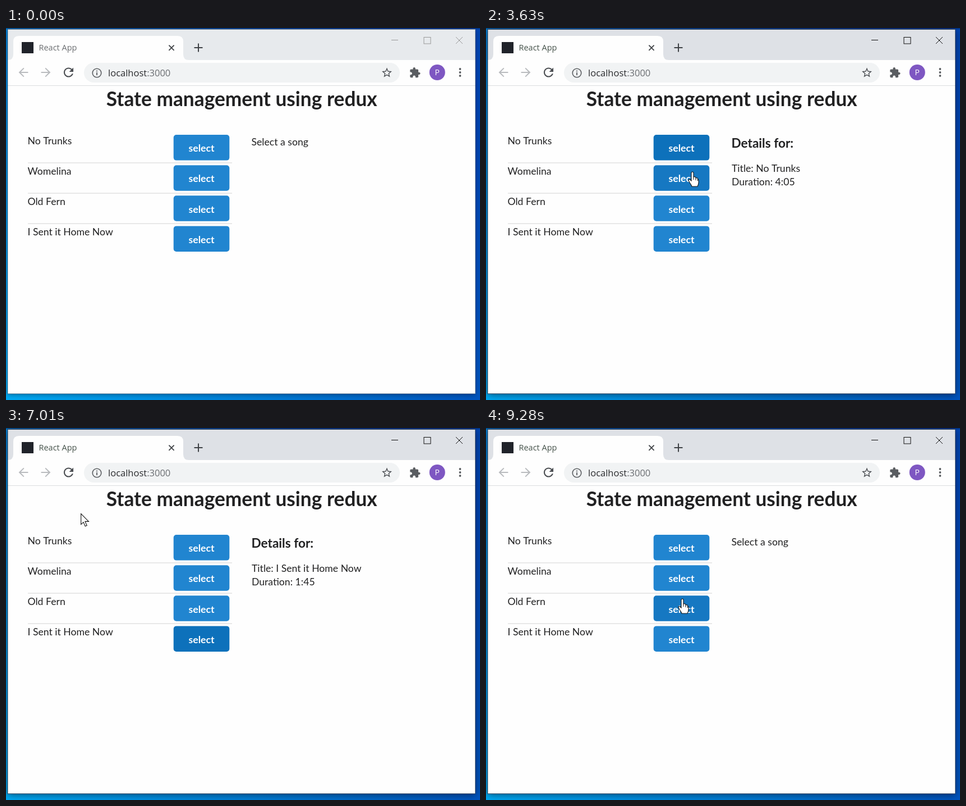
An HTML page with a canvas for the animation above (9480 ms loop, 845 by 662 pixels).

```html
<!DOCTYPE html>
<html lang="en">
<head>
<meta charset="utf-8">
<title>State management using redux</title>
<style>
html, body { margin: 0; width: 100%; height: 100%; overflow: hidden; }
canvas { display: block; }
</style>
</head>
<body>
<canvas id="stage" width="845" height="662"></canvas>
<script>
const ctx = document.getElementById('stage').getContext('2d');
const LOOP = 9480;
const UI = '"Open Sans", "Noto Sans", sans-serif';
const LATO = 'Lato, sans-serif';
const INK = '#212122';

const songs = [
  { title: 'No Trunks', duration: '4:05' },
  { title: 'Womelina', duration: '2:30' },
  { title: 'Old Fern', duration: '3:15' },
  { title: 'I Sent it Home Now', duration: '1:45' }
];
const BTN = { x: 298.7, y: 190.1, w: 99.6, h: 45.5, pitch: 54.1 };

const CLICKS = [
  { down: 2740, up: 2920, row: 0 },
  { down: 4010, up: 4200, row: 1 },
  { down: 5220, up: 5500, row: 3 }
];
const FOCUS_AT = 2740;
const LOAD = { start: 7930, blank: 8500, ready: 8600, end: 8880 };

// Pointer moves: start, last step, steps, end point, ease-out power
const ENTRY = [785, 668];
const MOVES = [
  [710, 1030, 4, 674, 557, 1],
  [1310, 1500, 3, 546, 455, 1.5],
  [1780, 2530, 9, 357, 211, 2],
  [3450, 3810, 5, 370, 264, 2],
  [4560, 5040, 6, 367, 372, 4],
  [5870, 6770, 10, 241, 234, 1.5],
  [7010, 7010, 1, 133, 152, 1],
  [7100, 7660, 7, 107, 86, 1.5],
  [8790, 9280, 6, 350, 304, 1.5]
];

const icon = {
  back: new Path2D('M20 11.1H7.83l5.59-5.69L12.2 4.2 4 12l8.2 7.8 1.21-1.21L7.83 12.9H20z'),
  reload: new Path2D('M17.65 6.35C16.2 4.9 14.21 4 12 4c-4.42 0-7.99 3.58-7.99 8s3.57 8 7.99 8c3.73 0 6.84-2.55 7.73-6h-2.08c-.82 2.33-3.04 4-5.65 4-3.31 0-6-2.69-6-6s2.69-6 6-6c1.66 0 3.14.69 4.22 1.78L13 11h7V4l-2.35 2.35z'),
  star: new Path2D('M22 9.24l-7.19-.62L12 2 9.19 8.63 2 9.24l5.46 4.73L5.82 21 12 17.27 18.18 21l-1.63-7.03zM12 15.4l-3.76 2.27 1-4.28-3.32-2.88 4.38-.38L12 6.1l1.71 4.04 4.38.38-3.32 2.88 1 4.28z'),
  puzzle: new Path2D('M20.5 11H19V7c0-1.1-.9-2-2-2h-4V3.5C13 2.12 11.88 1 10.5 1S8 2.12 8 3.5V5H4c-1.1 0-1.99.9-1.99 2v3.8H3.5c1.49 0 2.7 1.21 2.7 2.7s-1.21 2.7-2.7 2.7H2V20c0 1.1.9 2 2 2h3.8v-1.5c0-1.49 1.21-2.7 2.7-2.7 1.49 0 2.7 1.21 2.7 2.7V22H17c1.1 0 2-.9 2-2v-4h1.5c1.38 0 2.5-1.12 2.5-2.5S21.88 11 20.5 11z'),
  arrow: new Path2D('M.7 .7V19.6L5 15.6 8.2 22.8 11.2 21.4 8 14.4H14.4Z'),
  hand: new Path2D('M-2 2Q-2 0 0 0T2 2V9Q6 8 6 11Q10 10 9.5 13Q11 13 11 15V19Q11 22 9 26H-1Q-2 23 -5 19L-7 15Q-6 12 -4 14L-2 16Z')
};

function rect(x, y, w, h, color) {
  ctx.fillStyle = color;
  ctx.fillRect(x, y, w, h);
}

function round(x, y, w, h, r, color) {
  ctx.fillStyle = color;
  ctx.beginPath();
  ctx.roundRect(x, y, w, h, r);
  ctx.fill();
}

function disc(x, y, r, color) {
  ctx.fillStyle = color;
  ctx.beginPath();
  ctx.arc(x, y, r, 0, 7);
  ctx.fill();
}

function arc(x, y, r, from, to, color, width) {
  ctx.strokeStyle = color;
  ctx.lineWidth = width;
  ctx.beginPath();
  ctx.arc(x, y, r, from, to);
  ctx.stroke();
}

function lines(color, width, ...segments) {
  ctx.strokeStyle = color;
  ctx.lineWidth = width;
  ctx.beginPath();
  for (const [x1, y1, x2, y2] of segments) {
    ctx.moveTo(x1, y1);
    ctx.lineTo(x2, y2);
  }
  ctx.stroke();
}

function cross(x, y, r, color, width) {
  lines(color, width, [x - r, y - r, x + r, y + r], [x - r, y + r, x + r, y - r]);
}

function text(str, x, y, font, color, align = 'left') {
  ctx.font = font;
  ctx.fillStyle = color;
  ctx.textAlign = align;
  ctx.fillText(str, x, y);
}

// Draws a 24-unit icon around a centre point
function glyph(path, x, y, sx, color, sy = sx) {
  ctx.save();
  ctx.translate(x, y);
  ctx.scale(sx, sy);
  ctx.translate(-12, -12);
  ctx.fillStyle = color;
  ctx.fill(path, 'evenodd');
  ctx.restore();
}

function pointerAt(t) {
  let [x, y] = ENTRY;
  for (const [from, to, steps, ex, ey, power] of MOVES) {
    if (t < from) break;
    const gap = steps > 1 ? (to - from) / (steps - 1) : 1;
    const step = Math.min(steps, Math.floor((t - from + 10) / gap) + 1);
    const f = 1 - (1 - step / steps) ** power;
    x += (ex - x) * f;
    y += (ey - y) * f;
  }
  return { x: Math.round(x), y: Math.round(y) };
}

const rowTop = row => BTN.y + row * BTN.pitch;

function rowUnder(p) {
  if (p.x < BTN.x || p.x > BTN.x + BTN.w) return -1;
  return songs.findIndex((_, i) => p.y >= rowTop(i) && p.y <= rowTop(i) + BTN.h);
}

function stateAt(t) {
  const s = { pointer: pointerAt(t), focus: -1, pressed: -1, song: null };
  s.hover = rowUnder(s.pointer);
  s.active = t >= FOCUS_AT;
  s.loading = t >= LOAD.start && t < LOAD.end;
  s.blank = t >= LOAD.blank && t < LOAD.ready;
  if (t < LOAD.blank) {
    for (const c of CLICKS) {
      if (t < c.down) break;
      s.focus = c.row;
      s.pressed = t < c.up ? c.row : -1;
      if (t >= c.up) s.song = songs[c.row];
    }
  }
  return s;
}

function drawDesktop(active) {
  const g = ctx.createLinearGradient(0, 662, 845, 200);
  g.addColorStop(0, '#00a8f2');
  g.addColorStop(.45, '#0078d4');
  g.addColorStop(.75, '#0056c0');
  g.addColorStop(1, '#0045b4');
  rect(0, 0, 845, 662, g);
  rect(0, 0, 845, 2, 'rgba(0,30,80,.4)');

  ctx.save();
  ctx.shadowColor = active ? 'rgba(0,0,0,.5)' : 'rgba(0,0,0,.35)';
  ctx.shadowBlur = active ? 12 : 8;
  ctx.shadowOffsetY = 2;
  rect(3, 2, 834, 649, '#fefefe');
  ctx.restore();
}

function drawFrame(active) {
  ctx.strokeStyle = active ? 'rgba(0,25,55,.75)' : 'rgba(0,30,60,.45)';
  ctx.lineWidth = 1;
  ctx.strokeRect(3, 2.5, 833.7, 648.3);
}

function drawTabs(t, s) {
  rect(3, 3, 834, 54, s.active ? '#dee1e6' : '#e7eaed');
  ctx.fillStyle = '#fefefe';
  ctx.beginPath();
  ctx.moveTo(3, 57);
  ctx.quadraticCurveTo(13, 57, 13, 47);
  ctx.lineTo(13, 24);
  ctx.quadraticCurveTo(13, 14, 23, 14);
  ctx.lineTo(306, 14);
  ctx.quadraticCurveTo(316, 14, 316, 24);
  ctx.lineTo(316, 47);
  ctx.quadraticCurveTo(316, 57, 326, 57);
  ctx.fill();

  if (s.loading) {
    const a = (t - 8400) / 200 - 1.7;
    disc(39.5, 34.5, 6.5, '#20232a');
    arc(39.5, 34.5, 8.8, a, a + 2.4, '#93a7b9', 1.8);
  } else {
    rect(28, 25, 21, 20, '#20232a');
  }
  text('React App', 58.5, 40, '14.5px ' + UI, s.active ? '#45524a' : '#6b6e71');
  cross(295, 35.2, 4.6, '#3f4246', 1.8);
  lines('#3f4246', 2, [335.5, 35, 350.5, 35], [343, 27.5, 343, 42.5]);

  const ctl = s.active ? '#111' : '#999';
  lines(ctl, 1, [687, 21.5, 699, 21.5]);
  ctx.strokeRect(745, 16.5, 12, 11.5);
  cross(808, 22, 6, ctl, 1);
}

function drawToolbar(s) {
  const grey = '#5a5d61';
  rect(3, 57, 834, 45, '#fefefe');
  rect(3, 102, 834, 1, '#dcdee0');
  glyph(icon.back, 31, 79, 1.05, '#b9bbbe');
  glyph(icon.back, 71, 79, -1.05, '#b9bbbe', 1.05);
  if (Math.hypot(s.pointer.x - 111, s.pointer.y - 79) < 17) {
    disc(111.5, 79.5, 17.5, '#ebebec');
  }
  glyph(icon.reload, 111.5, 79, 1.07, '#4b4e52');

  round(139, 62, 563, 35, 17.5, '#f1f3f4');
  arc(162, 80, 7.8, 0, 7, grey, 1.6);
  rect(161.1, 79, 1.8, 5, grey);
  rect(161.1, 75.6, 1.8, 1.9, grey);
  const font = '16.5px ' + UI;
  text('localhost', 182, 86, font, '#2a2b2e');
  text(':3000', 182 + ctx.measureText('localhost').width, 86, font, '#6a6d71');

  glyph(icon.star, 679, 79.5, .9, '#505357');
  glyph(icon.puzzle, 729, 79.5, .87, grey);
  disc(768.8, 79, 14, '#7e57c2');
  text('P', 768.8, 84, '14px ' + UI, '#fff', 'center');
  for (const y of [73, 79, 85]) disc(809.5, y, 1.9, grey);
}

function buttonColor(row, s) {
  if (row === s.pressed) return '#1a69a4';
  if (row === s.focus) return '#0d71bb';
  return row === s.hover ? '#1678c2' : '#2185d0';
}

function drawPage(s) {
  const body = '17.64px ' + LATO;
  const bold = size => `bold ${size}px ${LATO}`;
  text('State management using redux', 420.2, 139, bold(35.28), INK, 'center');

  songs.forEach((song, i) => {
    const y = rowTop(i);
    if (i) rect(39, y - 4.9, 364, 1.3, '#dedede');
    text(song.title, 38.5, Math.round(y + 16.8), body, INK);
    round(BTN.x, y, BTN.w, BTN.h, 5, buttonColor(i, s));
    text('select', 348.5, y + 30.2, bold(17.64), '#fff', 'center');
  });

  if (s.song) {
    text('Details for:', 437.5, 213, bold(22.6), INK);
    text('Title: ' + s.song.title, 438, 256, body, INK);
    text('Duration: ' + s.song.duration, 438, 280, body, INK);
  } else {
    text('Select a song', 437.5, 209, body, INK);
  }
}

function drawPointer(s) {
  const shape = !s.blank && s.hover >= 0 ? icon.hand : icon.arrow;
  ctx.save();
  ctx.translate(s.pointer.x, s.pointer.y);
  ctx.fillStyle = '#fff';
  ctx.strokeStyle = '#111';
  ctx.lineWidth = 1.1;
  ctx.fill(shape);
  ctx.stroke(shape);
  if (shape === icon.hand) {
    lines('#111', 1, [2, 9, 2, 14], [6, 11, 6, 15], [9.5, 13, 9.5, 16]);
  }
  ctx.restore();
}

function draw(t) {
  const s = stateAt(t);
  drawDesktop(s.active);
  drawTabs(t, s);
  drawToolbar(s);
  if (!s.blank) drawPage(s);
  drawFrame(s.active);
  drawPointer(s);
}

const start = performance.now();
function tick() {
  draw((performance.now() - start) % LOOP);
  requestAnimationFrame(tick);
}
tick();
</script>
</body>
</html>
```
